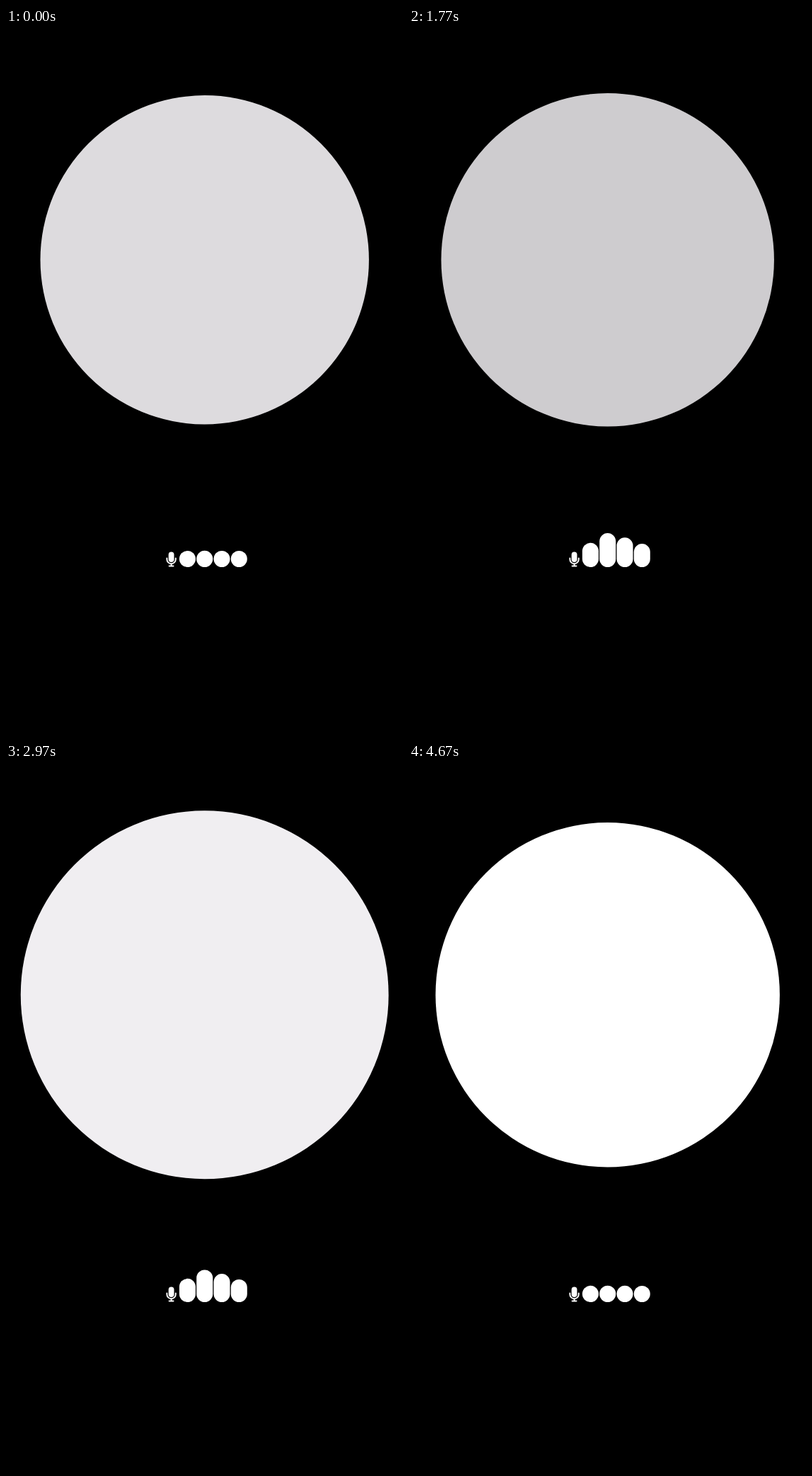
These frames come from a looping animation (561x998 px, 4700 ms). An HTML page:

```html
<!DOCTYPE html>
<html lang="en">
<head>
<meta charset="utf-8">
<title>Voice orb</title>
<style>
  html, body { margin: 0; width: 100%; height: 100%; overflow: hidden; background: #000; }
  svg { display: block; width: 561px; height: 998px; }
</style>
</head>
<body>
<svg viewBox="0 0 561 998" fill="#fff">
  <circle id="orb" cx="280.7" cy="327.3"/>
  <g transform="translate(226.4 739.6) scale(.0408)">
    <rect x="80" width="192" height="352" rx="96"/>
    <path d="M24 216v40a152 152 0 0 0 304 0v-40M176 408v80M104 488h144"
          fill="none" stroke="#fff" stroke-width="48" stroke-linecap="round"/>
  </g>
  <g id="bars"></g>
</svg>
<script>
const LOOP = 4700, BAR = 23, PITCH = 24.3, BASE = 761;
const SYLLABLE = 553, LOUDEST = 2470, SPREAD = 760, PEAK = 38;
const RESPONSE = [.45, 1, .75, .4];   // how strongly each bar follows the voice

// Orb key points: time in ms, radius, brightness
const KEYS = [
  [0, 232.2, 221], [670, 225.7, 157], [1100, 226.7, 176], [2100, 239.4, 221],
  [2400, 254.7, 241], [3250, 262.5, 239], [3930, 248.2, 251], [LOOP, 243, 257]
];

function orbAt(t) {
  const next = KEYS.findIndex(([time]) => time > t);
  const from = KEYS[next - 1], to = KEYS[next];
  const mix = (t - from[0]) / (to[0] - from[0]);
  return from.map((value, i) => value + (to[i] - value) * mix);
}

// Voice level: syllable pulses that swell and fade away
function levelAt(t) {
  const swell = Math.exp(-(((t - LOUDEST) / SPREAD) ** 2) / 2);
  return PEAK * swell * Math.cos(Math.PI * (t - 1770) / SYLLABLE) ** 2;
}

function set(node, attributes) {
  for (const name in attributes) node.setAttribute(name, attributes[name]);
}

const orb = document.getElementById('orb');
const group = document.getElementById('bars');
const bars = RESPONSE.map((_, i) => {
  const bar = document.createElementNS(group.namespaceURI, 'rect');
  set(bar, { x: 244.9 + i * PITCH, width: BAR, rx: BAR / 2 });
  return group.appendChild(bar);
});

function draw(t) {
  const [, r, light] = orbAt(t);
  set(orb, { r, fill: `rgb(${[light, light - 2, light + 1].map(Math.round)})` });
  bars.forEach((bar, i) => {
    const height = BAR + levelAt(t) * RESPONSE[i];
    set(bar, { y: BASE - height, height });
  });
}

const start = performance.now();
function frame() {
  draw((performance.now() - start) % LOOP);
  requestAnimationFrame(frame);
}
frame();
</script>
</body>
</html>
```
